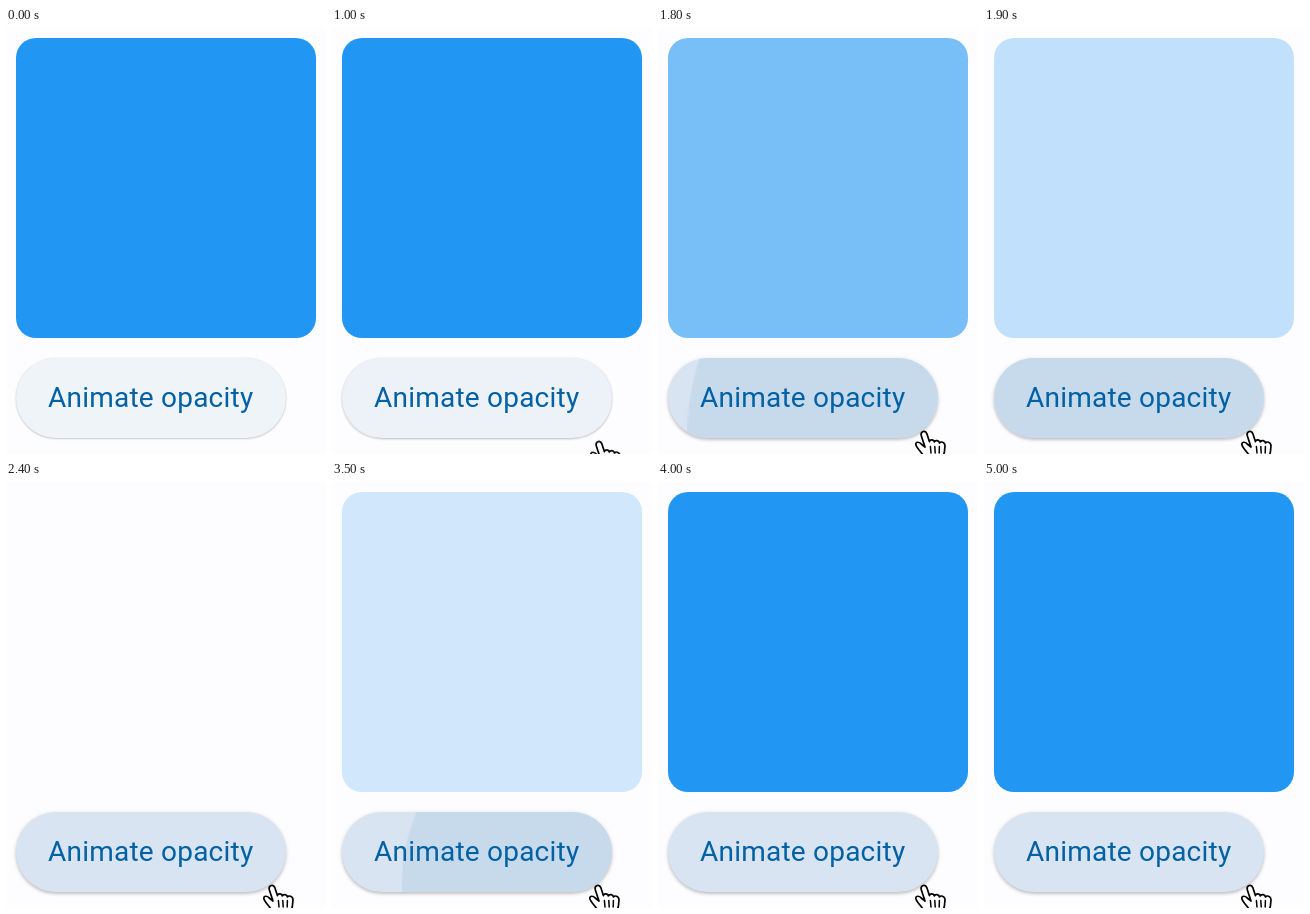
Recreate the animation shown at these times as an HTML page. Size 320x426 px, loop 5.73 s.

```html
<!DOCTYPE html>
<html lang="en">
<head>
<meta charset="utf-8">
<title>Animate opacity</title>
<style>
  html, body {
    margin: 0;
    width: 100%;
    height: 100%;
    overflow: hidden;
    background: #fdfcff;
  }
  .stage {
    position: relative;
    width: 320px;
    height: 426px;
    overflow: hidden;
  }
  .stage * {
    position: absolute;
    animation: 5730ms linear infinite;
  }
  .stage .box {
    left: 10px;
    top: 10px;
    width: 300px;
    height: 300px;
    border-radius: 20px;
    background: #2196f3;
    animation-name: fade;
  }
  .stage .button {
    left: 10px;
    top: 330px;
    width: 270px;
    height: 80px;
    border-radius: 40px;
    overflow: hidden;
    animation-name: hover;
  }
  .stage .ripple {
    left: -30px;
    top: -210px;
    width: 570px;
    height: 570px;
    border-radius: 50%;
    background: #c6daec;
    animation-name: grow, glow;
  }
  .stage .label {
    left: 32px;
    top: 0;
    font: 400 28px/80px Roboto, sans-serif;
    letter-spacing: .22px;
    white-space: nowrap;
    color: #0061a4;
    animation: none;
  }
  .stage .hand {
    left: 250px;
    top: 395px;
    animation-name: enter;
  }
  .hand * { animation: none; }

  @keyframes fade {
    0%, 67.103%, 100% { opacity: 1; }
    27.574% { opacity: 1; animation-timing-function: ease-in-out; }
    36.3% { opacity: 0; }
    58.377% { opacity: 0; animation-timing-function: ease-in-out; }
  }
  @keyframes hover {
    0%, 16.58% {
      background: #eff4f9;
      box-shadow: 0 1px 2px rgba(0, 0, 0, .18), 0 0 2px rgba(0, 0, 0, .1);
    }
    22.69%, 100% {
      background: #d8e4f1;
      box-shadow: 0 2px 3px rgba(0, 0, 0, .16), 0 1px 5px rgba(0, 0, 0, .12);
    }
  }
  @keyframes grow {
    0%, 27.574% { transform: scale(.35); }
    32.81%, 41.88% { transform: scale(1); }
    41.9%, 58.377% { transform: scale(.35); }
    63.613%, 100% { transform: scale(1); }
  }
  @keyframes glow {
    0%, 27.923% { opacity: 0; }
    29.32%, 36.649% { opacity: 1; }
    41.88%, 58.726% { opacity: 0; }
    60.122%, 65.445% { opacity: 1; }
    68.06%, 100% { opacity: 0; }
  }
  @keyframes enter {
    0%, 14.834% { transform: translate(3px, 32px); animation-timing-function: ease-out; }
    20.07%, 100% { transform: none; }
  }
</style>
</head>
<body>
<div class="stage">
  <div class="box"></div>
  <div class="button">
    <div class="ripple"></div>
    <span class="label">Animate opacity</span>
  </div>
  <svg class="hand" width="42" height="44" viewBox="250 395 42 44" fill="#fff" stroke="#000"
       stroke-width="1.7" stroke-linecap="round" stroke-linejoin="round">
    <path d="M267 419 L263.2 407.4 C262.4 403.2 267.4 401.8 268.8 405.6 L271.4 413.6
             C272 411.2 276 411.4 276.4 414 C277.2 411.8 281 412.4 281.5 415
             C282.4 413.2 287 414 287 418 L286.4 424 Q285 429 284 434 H269
             C267 427 258.6 421 257.8 416.4 C257.8 413.4 261.4 413.8 263.2 416 Z"/>
    <path d="M272.4 418.5 L273 425 M276.8 418.5 L277.2 425 M281.4 418.5 L281.2 425" stroke-width="1.5"/>
  </svg>
</div>
<script>
  // The motion advances in 100 ms steps.
  const LOOP = 5730, STEP = 100;
  const motions = document.getAnimations();
  motions.forEach(m => m.pause());

  function draw() {
    const time = performance.now() % LOOP;
    const shown = Math.floor(time / STEP) * STEP;
    motions.forEach(m => { m.currentTime = shown; });
    requestAnimationFrame(draw);
  }
  draw();
</script>
</body>
</html>
```
